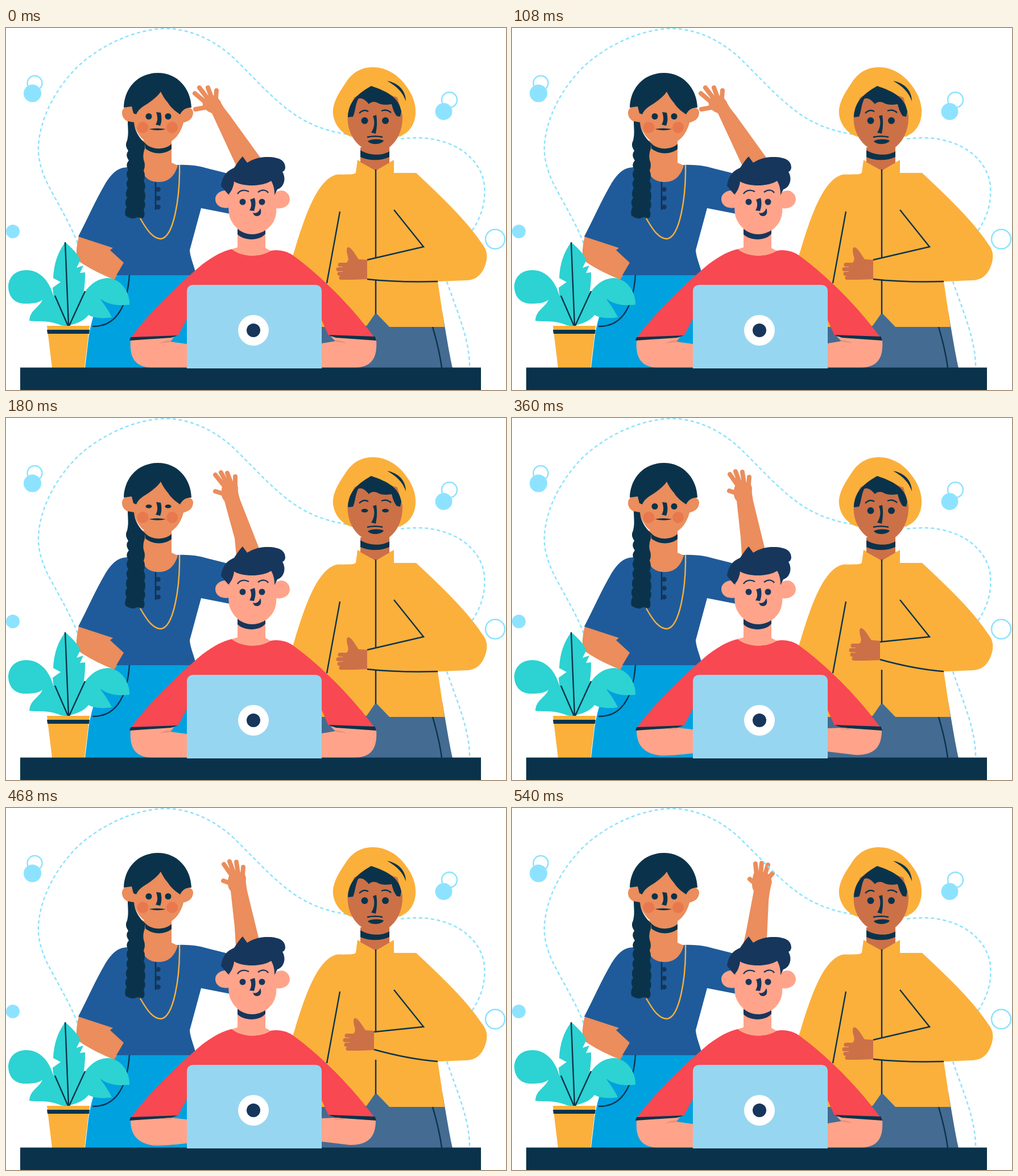
Write an HTML page that moves like this. It is 879 px wide and 637 px high and loops after 0.72 s.

```html
<!DOCTYPE html>
<html lang="en">
<head>
<meta charset="utf-8">
<title>Friends at a laptop</title>
<style>
  html, body { margin: 0; width: 100%; height: 100%; overflow: hidden; background: #fff; }
  svg { display: block; width: 100vw; height: 100vh; }
  .line { fill: none; stroke: #0a334b; stroke-width: 2.4; }
  .sky { fill: #8de3ff; }
  .ring { fill: none; stroke: #8de3ff; stroke-width: 2.5; }
  .navy { fill: #0a334b; }
  .ink { fill: #17365c; }
  .tan { fill: #eb8d5c; }
  .pink { fill: #ffa48a; }
  .brown { fill: #cc7048; }
  .gold { fill: #fbb03b; }
  .red { fill: #f84852; }
  .teal { fill: #2dd2d2; }
  .fingers { fill: none; stroke-linecap: round; }
</style>
</head>
<body>
<svg viewBox="0 0 879 637" preserveAspectRatio="none">
  <!-- waving arm -->
  <path id="arm" class="tan"/>
  <path id="fingers" class="fingers" stroke="#eb8d5c" stroke-width="8"/>

  <!-- backdrop -->
  <path class="ring" stroke-dasharray="6 4.6" d="M126 379C113 344 88 304 72 272C60 246 56 226 57 207C60 160 85 108 128 66C170 28 232 0 285 1C326 3 362 20 394 47C432 82 462 120 507 152C538 173 570 183 606 188M694 195C716 193 734 192 752 196C798 204 832 233 840 270C845 304 836 332 819 357M775 446C785 476 802 518 809 549C814 571 815 584 815 598"/>
  <circle class="ring" cx="50.500" cy="97" r="13"/><circle class="sky" cx="46.500" cy="115" r="15.500"/>
  <circle class="ring" cx="779.500" cy="126.500" r="13.500"/><circle class="sky" cx="769.500" cy="147" r="15"/>
  <circle class="sky" cx="12" cy="358" r="12"/>
  <circle class="ring" cx="860" cy="371.500" r="17"/>

  <!-- man in turban -->
  <path fill="#446b92" d="M555 500H767C775 546 780 577 785 598H555Z"/>
  <path class="line" d="M750 526C757 550 763 574 766 598"/>
  <path class="gold" d="M618 232L650 250L682 232V255H721C764 295 812 341 837 380C849 394 846 409 841 421C835 436 824 444 808 444L759 446L771 526H674L650 501L634 524L555 526L500 412L505 398C520 352 542 268 581 258C598 257 614 259 615 254Z"/>
  <path class="gold" d="M642 69C673 68 694 87 707 107C727 137 723 170 703 185L693 191H606C584 183 573 161 575 143C577 126 588 110 598 95C609 78 624 70 642 69Z"/>
  <path class="brown" d="M623 210H674V237L650 251L623 236Z"/>
  <path class="navy" d="M623 215C637 224 660 226 674 217V227C659 234 638 234 623 227Z"/>
  <path class="brown" d="M601 150C598 181 612 203 632 214C645 222 655 222 666 215C685 205 698 183 697 154L688 122L642 108L612 122Z"/>
  <path class="navy" d="M601 157C602 134 612 119 642 102C672 112 691 123 695 147L693 156L687 155C682 148 680 142 678 134C667 136 658 135 652 131C647 129 641 130 638 134C633 127 624 121 619 125C614 135 614 148 610 156Z"/>
  <path class="navy" d="M670 93C687 96 703 108 703 129C697 112 687 103 670 93Z"/>
  <path class="line" d="M621 150Q629 142 637 147M660 146Q669 142 677 149"/>
  <ellipse class="navy blink" cx="630.500" cy="163" rx="6" ry="6"/>
  <ellipse class="navy blink" cx="667" cy="163" rx="6" ry="6"/>
  <path class="navy" d="M645 155L651 153C653 166 652 176 650 186L642 184C648 175 649 164 645 155Z"/>
  <path class="line" d="M635 192Q649 189 662 192"/>
  <path class="navy" d="M636 199C643 195 657 195 664 198C660 206 640 206 636 199Z"/>
  <path class="line" d="M587 323L564 449M650 443V503"/>
  <path id="seams" class="line"/>
  <g id="hand">
    <path class="brown" d="M635 408L620 407C615 401 610 389 603 386C597 384 599 396 601 402C603 411 600 413 592 416V440L608 443L635 442Z"/>
    <path class="fingers" stroke="#cc7048" stroke-width="7" d="M603 416.500H587M603 424.500H584M603 432.500H586M606 439.500H589"/>
  </g>

  <!-- woman -->
  <path fill="#00a1df" d="M192 434H335V598H139L145 547C151 500 170 462 192 434Z"/>
  <path class="line" d="M217 435C214 474 202 526 152 525"/>
  <path class="tan" d="M128 366L192 384L209 413L190 443C172 435 147 424 129 411C121 403 124 384 128 366Z"/>
  <path fill="#1f5b9a" d="M213 245C195 246 185 257 175 273C158 302 142 338 127 367L188 387L183 391L207 413L194 435H334C332 420 324 406 323 391L343 317L394 327V257L354 247C338 242 320 240 302 241L238 244Z"/>
  <path class="tan" d="M238 198H291V237L302 242C296 262 285 271 268 271C250 271 240 260 238 246Z"/>
  <path class="navy" d="M245 203C256 215 280 215 291 204V213C279 223 258 223 245 212Z"/>
  <path class="tan" d="M220 112H316V140C314 183 296 205 268 206C238 206 219 178 220 130Z"/>
  <path class="tan" d="M226 139C211 134 203 142 204 151C205 161 215 168 227 166ZM308 142C320 135 330 142 329 150C328 161 319 166 307 167Z"/>
  <path class="navy" d="M207 140C208 105 232 79 267 79C302 79 325 107 326 140C314 140 310 145 306 152C297 146 290 140 285 132C278 124 275 118 272 112C267 120 259 126 249 133C239 139 233 143 229 152L224 150L221 138Z"/>
  <path class="navy" d="M214 164L225 166C226 180 234 194 245 203L244 212Q240 222 242 232Q246 242 242 251Q246 260 242 269Q247 278 243 286Q247 296 243 304Q247 312 242 320Q246 331 240 335Q231 331 226 335Q217 336 210 330Q208 321 212 315Q207 306 213 299Q208 290 214 282Q209 273 215 266Q209 257 215 249Q209 241 216 233Q209 224 215 216Q208 206 213 198C216 185 214 175 214 164Z"/>
  <g fill="#e8784d"><circle cx="240.500" cy="175" r="10"/><circle cx="292" cy="175" r="10"/></g>
  <ellipse class="navy blink" cx="251" cy="155.500" rx="5.500" ry="5.500"/>
  <ellipse class="navy blink" cx="285" cy="155.500" rx="5.500" ry="5.500"/>
  <path class="navy" d="M264 148L272 149C274 157 274 165 271 172L263 170C267 164 267 157 264 148Z"/>
  <path class="navy" d="M252 178Q266 175 281 178Q266 182 252 178Z"/>
  <path class="line" d="M263 271V320"/>
  <g class="ink"><circle cx="267.500" cy="284" r="4.300"/><circle cx="267.500" cy="299.500" r="4.300"/><circle cx="267.500" cy="315" r="4.300"/></g>
  <path class="line" style="stroke:#fbb03b" d="M305 241C306 298 295 369 272 371C256 371 243 347 236 335"/>

  <!-- plant -->
  <path class="teal" d="M108 525C104 500 90 480 83 470C75 441 56 426 36 426C14 426 4 441 4 456C5 475 17 486 36 485C49 485 59 483 64 478C59 492 42 496 41 515C54 518 74 513 96 523Z"/>
  <path class="teal" d="M110 524C117 500 128 480 139 464C152 446 166 440 181 440C204 443 218 466 217 487C199 489 181 488 165 476C174 488 181 498 186 509C170 512 153 510 145 505C138 515 124 520 110 524Z"/>
  <path class="teal" d="M104 377C92 393 84 414 83 440L96 447L82 457C83 480 94 506 108 524H112C130 500 140 466 139 430L130 431L136 418L124 422L131 408C124 395 114 385 104 377Z"/>
  <path class="line" d="M104 377L110 524M86 471L109 524M139 463L111 524"/>
  <path class="gold" d="M72 524H147L138 598H81Z"/>
  <path class="navy" d="M72 531H147L146 538H73Z"/>

  <!-- boy -->
  <path class="red" d="M397 389C415 403 445 404 465 392C480 389 496 393 507 402C556 438 608 490 651 549L650 543L567 541L554 512H318L302 542L217 549C243 510 302 452 345 416C365 401 382 392 397 389Z"/>
  <path id="sleeves" class="pink"/>
  <path class="navy" d="M217 550L219 544L302 541L290 545ZM651 550L649 543L567 540L580 545Z"/>
  <path id="folds" fill="#e8937c"/>
  <path class="pink" d="M407 350H456V387L465 392C447 404 415 404 397 389L407 386Z"/>
  <path class="ink" d="M407 353C417 364 445 366 456 353V362C445 376 417 374 407 363Z"/>
  <path class="pink" d="M398 262C392 286 389 315 393 332C399 350 415 363 433 363C456 362 473 346 475 325C477 300 474 280 468 260Z"/>
  <path class="pink" d="M392 286C377 284 368 292 368 301C368 311 377 319 393 316ZM474 289C487 281 499 290 499 302C498 314 486 319 474 317Z"/>
  <path class="ink" d="M416 226L424 237C434 231 442 228 455 227C482 226 491 234 491 246C490 250 489 252 486 253C494 267 487 281 477 284L472 294C472 283 470 275 466 269C452 279 416 280 401 270C400 280 396 288 391 293L378 278C380 260 389 251 401 246C405 240 410 232 416 226Z"/>
  <path class="line" style="stroke:#17365c" d="M407 292C411 285 420 284 427 288M443 289C449 284 457 284 461 290"/>
  <g class="ink">
    <circle cx="416" cy="306" r="5.500"/><circle cx="450" cy="306" r="5.500"/>
    <path d="M429 302L437 299C440 308 438 316 436 322L428 321C432 315 432 308 429 302Z"/>
    <path d="M434 325C439 327 444 325 447 317C450 324 448 331 441 331C437 331 435 328 434 325Z"/>
  </g>

  <!-- laptop and desk -->
  <path fill="#97d6f1" d="M318 599V464Q318 452 330 452H543Q555 452 555 464V599Z"/>
  <circle cx="435" cy="532" r="27" fill="#fff"/>
  <circle cx="435" cy="532" r="12" class="ink"/>
  <path class="navy" d="M25 597.500H318V599H555V597.500H835V637H25Z"/>
</svg>
<script>
const STEP = 180;
const $ = id => document.getElementById(id);
const set = (el, attrs) => { for (const k in attrs) el.setAttribute(k, attrs[k]); };

const waves = [
  { arm: "M405 243L362 150C354 147 349 143 346 136L345 127C352 120 362 117 370 120L377 129C380 137 386 144 393 153L450 232Z",
    fingers: "M352 132L332 115M356 126L340 105M362 124L355 105M369 124L370 110M355 139L333 143" },
  { arm: "M405 243L402 212L384 146C378 140 377 130 381 117C388 111 398 111 406 117L408 122C407 131 410 138 412 145L446 232Z",
    fingers: "M384 120L368 100M389 116L378 96M396 115L389 97M403 118L403 103M384 134L368 129" },
  { arm: "M404 243L402 210L395 146C389 140 388 128 393 117C402 111 412 111 420 117L422 123C421 132 423 138 424 146L445 232Z",
    fingers: "M397 119L383 99M401 116L393 94M408 115L405 95M416 118L417 104M396 133L382 128" },
  { arm: "M406 243L412 215L425 146C420 138 422 125 425 115C434 110 445 112 454 118L457 130C454 142 452 152 451 165L448 232Z",
    fingers: "M430 118L428 98M437 115L439 97M445 116L450 100M451 123L458 115M428 134L418 125" }
];

const rest = {
  seams: "M650 249V405M682 320L734 385L635 408M635 442C680 447 720 447 759 446",
  hand: "translate(0 0)",
  sleeves: "M219 549L295 544L289 552L318 556V598H258C226 597 217 580 219 549ZM651 549L571 543L579 551L555 555V598H612C644 597 653 580 651 549Z",
  folds: "M269 555Q279 549 291 549L289 553ZM599 555Q590 549 578 549L579 552Z"
};
const lifted = {
  seams: "M650 249V394M682 320L734 385L647 394M647 425C690 437 722 443 759 446",
  hand: "translate(12 -16)",
  sleeves: "M219 549L290 545L318 548V590C292 593 274 594 262 594C233 591 219 577 219 549ZM650 549L580 545L555 546V587L605 593C640 593 650 576 650 549Z",
  folds: "M270 548Q279 545 291 545L290 548ZM597 549Q588 544 577 545L578 548Z"
};

const eyes = [...document.querySelectorAll(".blink")];
let shown = -1;

function pose(i) {
  const p = i === 2 ? lifted : rest;
  set($("arm"), { d: waves[i].arm });
  set($("fingers"), { d: waves[i].fingers });
  for (const id of ["seams", "sleeves", "folds"]) set($(id), { d: p[id] });
  set($("hand"), { transform: p.hand });
  for (const eye of eyes) set(eye, { ry: i === 1 ? 3.3 : eye.getAttribute("rx") });
}

const start = performance.now();
function tick(now) {
  const i = Math.floor(Math.max(0, now - start) / STEP) % waves.length;
  if (i !== shown) pose(shown = i);
  requestAnimationFrame(tick);
}
tick(start);
</script>
</body>
</html>
```
